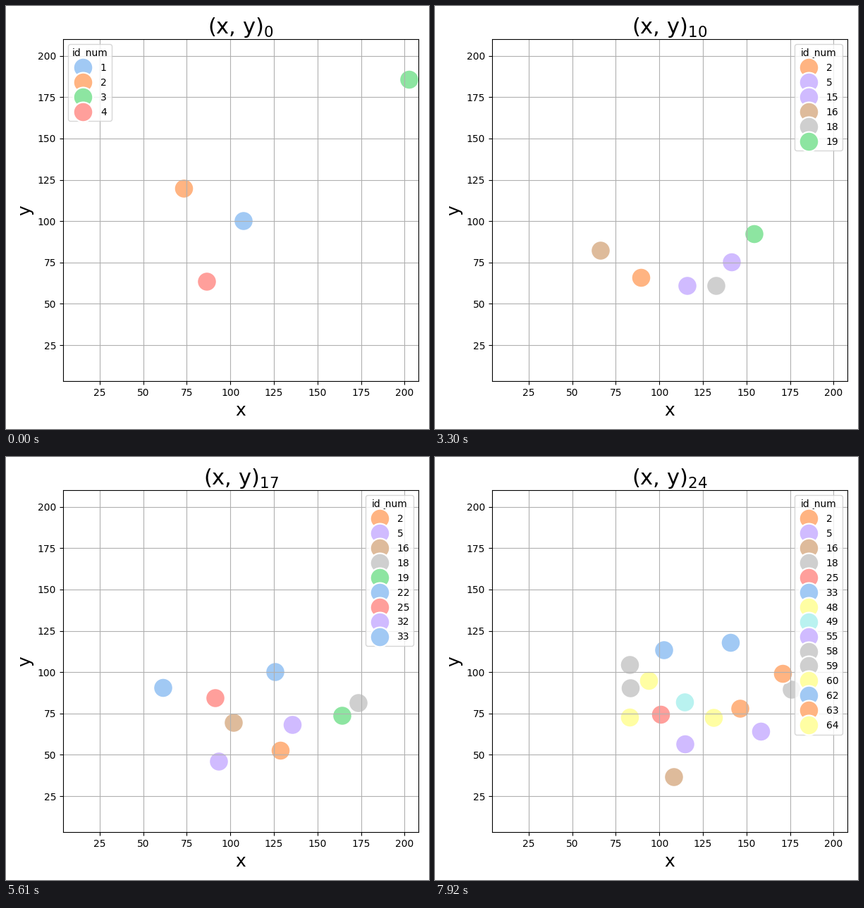
Animation of 600x600 px, one loop 8 s. Source, as a matplotlib script:

```python
import numpy as np
import matplotlib.pyplot as plt
from matplotlib.animation import FuncAnimation
from matplotlib.lines import Line2D

STEP_MS = 330
TICK_MS = 40
LOOP_MS = 8000
LAST = LOOP_MS // STEP_MS
LEFT, RIGHT, BOTTOM, TOP = 81, 585, 67.7, 552.7
XLIM, YLIM = (4, 207.95), (3.14, 209.98)
STOPS = np.array([0, 3, 10, 14, 17, 20, 24])

BLUE, ORANGE, GREEN, RED, PURPLE = "#a1c9f4", "#ffb482", "#8de5a1", "#ff9f9b", "#d0bbff"
BROWN, PINK, GREY, YELLOW, CYAN = "#debb9b", "#fab0e4", "#cfcfcf", "#fffea3", "#b9f2f0"

plt.rcParams["font.family"] = "DejaVu Sans"
walkers = []


def walker(num, color, born, gone, *points):
    """Walk from point to point, one per stop after birth, swaying in between.

    Without points the walker strays around a random place near the crowd.
    """
    rng = np.random.default_rng(num)
    sway = rng.normal(0, 7, (LAST + 1, 2))
    if points:
        sway[STOPS] = 0
    else:
        points = [rng.normal((310, 365), (55, 35))]
    first = np.searchsorted(STOPS, born)
    times = STOPS[first:first + len(points)]
    steps = np.arange(LAST + 1)
    path = np.column_stack([np.interp(steps, times, p) for p in zip(*points)]) + sway
    walkers.append((num, color, born, gone, path))


walker(1, BLUE, 0, 0, (337, 305))
walker(2, ORANGE, 0, LAST, (252.5, 259), (289, 301.5), (292.5, 385.5), (323, 391),
       (389.5, 416.5), (430.5, 364.5), (433, 357))
walker(3, GREEN, 0, 0, (572, 104.5))
walker(4, RED, 0, 0, (285, 391))
walker(5, PURPLE, 1, LAST, (343, 308), (358, 397), (390, 386.5), (406.5, 380),
       (394, 396), (355, 407.5))
walker(6, BROWN, 1, 1)
walker(7, PINK, 2, 2)
walker(8, GREY, 2, 2)
walker(9, YELLOW, 3, 7, (325, 421))
walker(10, CYAN, 3, 4, (364, 368))
walker(11, BLUE, 4, 5)
walker(15, PURPLE, 6, 11, (421, 363.5))
walker(16, BROWN, 6, LAST, (235, 347), (280.5, 399), (323, 377), (308.5, 418.5), (339, 454))
walker(18, GREY, 7, LAST, (399, 397), (431.5, 392), (500, 349), (485.5, 312), (506, 330))
walker(19, GREEN, 8, 21, (453, 323.5), (464, 317), (477, 367), (368, 351))
walker(20, CYAN, 11, 11)
walker(22, BLUE, 12, 22, (229, 388), (223, 327.5), (249, 313.5))
walker(25, RED, 13, LAST, (309, 348.5), (297, 342), (320, 365.5), (320.5, 365.5))
walker(26, PURPLE, 14, 15, (355.5, 381.5))
walker(28, GREY, 15, 15)
walker(32, PURPLE, 16, 17, (302, 432))
walker(33, BLUE, 17, LAST, (382, 305), (394, 287), (419.5, 263.5))
walker(36, RED, 18, 18)
walker(45, BROWN, 19, 20, (233, 400.5))
walker(48, YELLOW, 20, LAST, (349, 414), (395.5, 370))
walker(49, CYAN, 21, LAST, (354.5, 348))
walker(50, PURPLE, 21, 21)
walker(52, GREEN, 22, 22)
walker(55, PURPLE, 22, LAST, (462.5, 389.5))
walker(58, GREY, 22, LAST, (276.5, 295))
walker(59, GREY, 23, LAST, (277.5, 328))
walker(60, YELLOW, 23, LAST, (303.5, 317.5))
walker(62, BLUE, LAST, LAST, (325, 274))
walker(63, ORANGE, LAST, LAST, (493.5, 307.5))
walker(64, YELLOW, LAST, LAST, (276.5, 369.5))

fig = plt.figure(figsize=(6, 6), dpi=100)
ax = fig.add_axes([LEFT / 600, BOTTOM / 600, (RIGHT - LEFT) / 600, (TOP - BOTTOM) / 600])
ax.set(xlim=XLIM, ylim=YLIM)
ax.set_xticks(range(25, 201, 25))
ax.set_yticks(range(25, 201, 25))
ax.set_xlabel("x", fontsize=18)
ax.set_ylabel("y", fontsize=18)
ax.grid(True)
title = ax.set_title("", fontsize=22)
dots = ax.scatter([], [], s=400, edgecolors="white", linewidths=1.6)


def to_data(x, y):
    return (np.interp(x, (LEFT, RIGHT), XLIM),
            np.interp(600 - y, (BOTTOM, TOP), YLIM))


def swatch(num, color):
    return Line2D([], [], linestyle="none", marker="o", markersize=20, color=color,
                  markeredgecolor="white", markeredgewidth=1.6, label=str(num))


def show(step):
    alive = [w for w in walkers if w[2] <= step <= w[3]]
    dots.set_offsets([to_data(*path[step]) for *_, path in alive])
    dots.set_facecolors([w[1] for w in alive])
    title.set_text(f"(x, y)$_{{{step}}}$")
    ax.legend(handles=[swatch(*w[:2]) for w in alive], title="id_num",
              loc="upper left" if step == 0 else "upper right")


shown = None


def update(i):
    global shown
    step = (i * TICK_MS + TICK_MS - 1) // STEP_MS
    if step != shown:
        show(step)
        shown = step
    return ()


def init():
    global shown
    shown = None
    return update(0)


anim = FuncAnimation(fig, update, init_func=init, frames=LOOP_MS // TICK_MS,
                     interval=TICK_MS, repeat=True, repeat_delay=0, blit=False)
plt.show()
```
